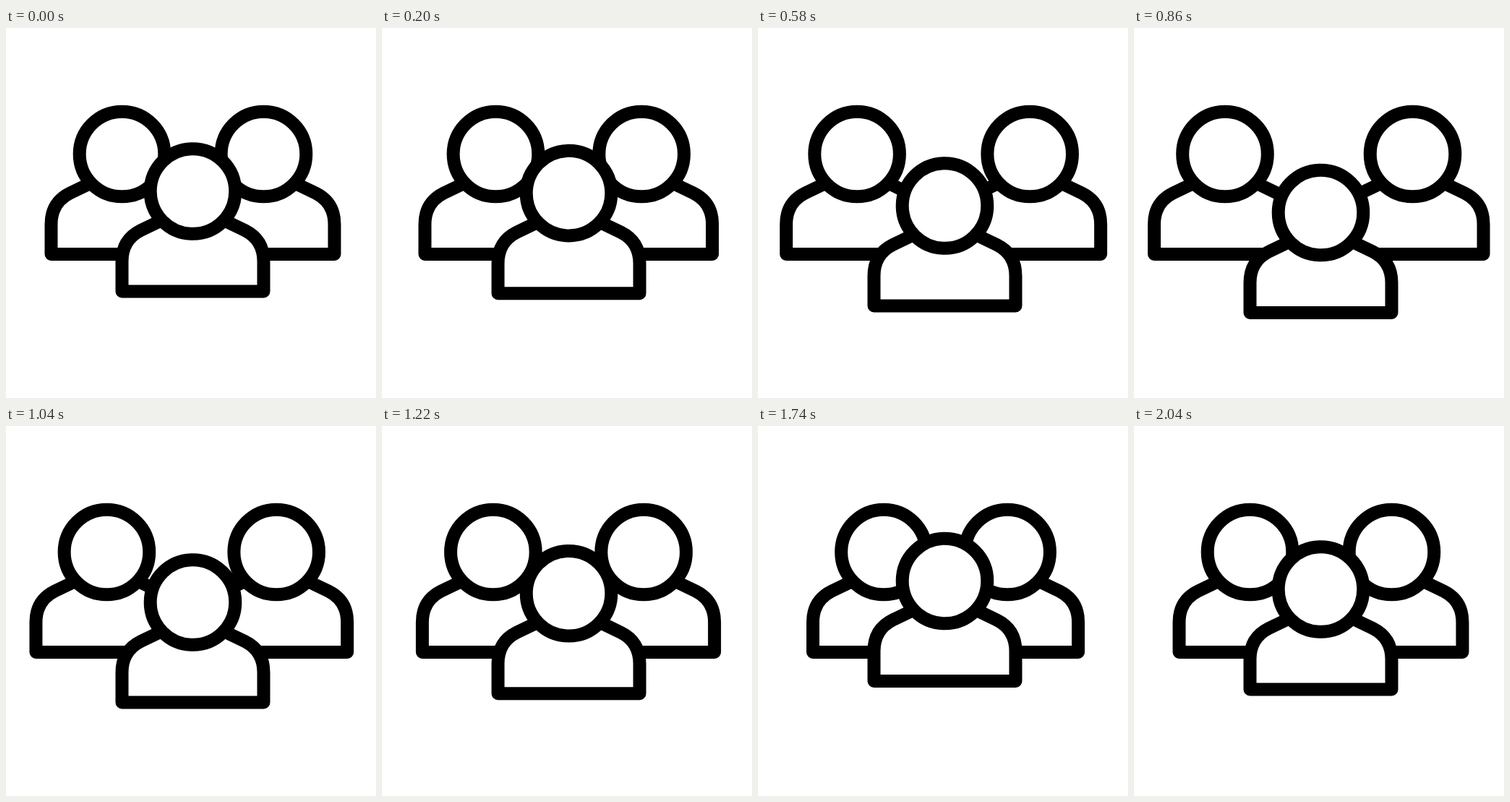
Write an HTML page that moves like this. It is 512x512 px and loops after 2100 ms.

```html
<!DOCTYPE html>
<html lang="en">
<head>
<meta charset="utf-8">
<title>Group</title>
<style>
  html, body { margin: 0; width: 100%; height: 100%; overflow: hidden; background: #fff; }
  svg { display: block; width: 100vw; height: 100vh; }
</style>
</head>
<body>
<svg viewBox="0 0 512 512">
  <defs>
    <g id="person" fill="#fff" stroke="#000" stroke-width="18" stroke-linejoin="round">
      <path d="M-47 42 L-72 54 C-86 61 -98 74 -98 97 V138.5 H98 V97 C98 74 86 61 72 54 L47 42"/>
      <circle r="58.8"/>
    </g>
  </defs>
  <use id="left" href="#person"/>
  <use id="right" href="#person"/>
  <use id="front" href="#person"/>
</svg>
<script>
  const LOOP = 2100, STEP = 20;

  // Spread of the group over time: [ms, offset in px, velocity in px/ms]
  const keys = [
    [40, 0, 0], [360, 8.5, .04], [580, 20, .064], [775, 33, 0],
    [860, 29.5, -.06], [1120, 12.5, -.07], [1220, 5.7, -.065],
    [1520, -11.4, -.04], [1630, -14, 0], [2040, 0, 0]
  ];

  function spread(t) {
    const i = keys.findIndex(k => k[0] > t);
    if (i < 1) return 0;
    const [t0, p0, v0] = keys[i - 1], [t1, p1, v1] = keys[i];
    const d = t1 - t0, u = (t - t0) / d, w = 1 - u;
    return p0 * w * w * (1 + 2 * u) + p1 * u * u * (3 - 2 * u)
      + d * u * w * (v0 * w - v1 * u);
  }

  function place(id, x, y) {
    document.getElementById(id).setAttribute("transform", `translate(${x} ${y})`);
  }

  function draw(t) {
    const s = spread(t);
    place("left", 160.5 - 1.17 * s, 174.5);
    place("right", 356.5 + .985 * s, 174.5);
    place("front", 258.5, 226 + s);
  }

  function tick() {
    const t = performance.now() % LOOP;
    draw(t < 60 ? 0 : Math.floor(t / STEP) * STEP);
    requestAnimationFrame(tick);
  }
  tick();
</script>
</body>
</html>
```
